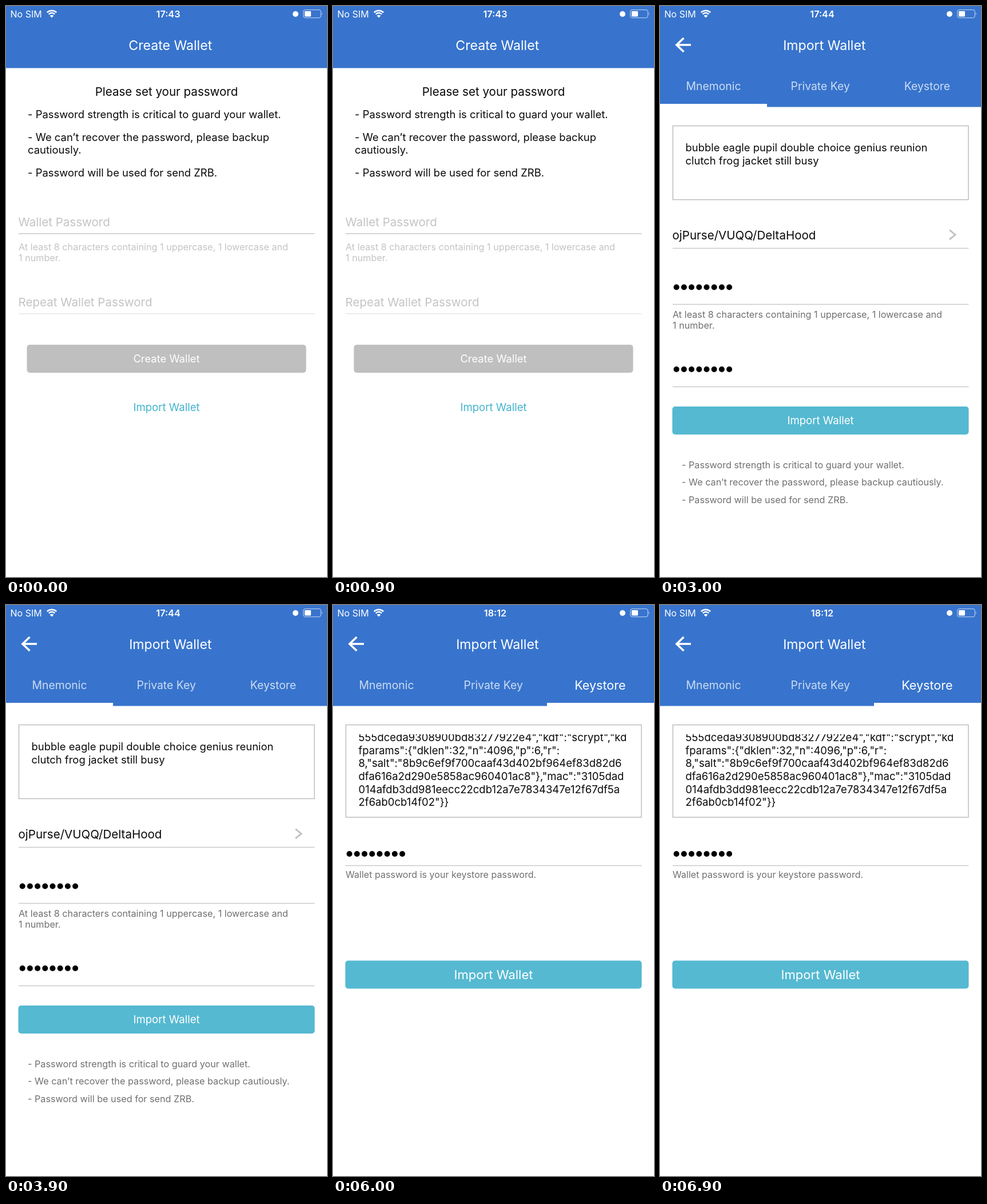
These frames come from a looping animation (561x998 px, 7.5 s). An HTML page:

```html
<!DOCTYPE html>
<html lang="en">
<head>
<meta charset="utf-8">
<title>Import wallet</title>
<style>
html, body { margin: 0; height: 100%; overflow: hidden; background: #fff; }
svg { display: block; width: 100%; height: 100%; }
text { font-family: Inter, Roboto, sans-serif; white-space: pre; }
</style>
</head>
<body>
<svg id="stage" viewBox="0 0 561 998"></svg>
<script>
const STEP = 1500;
const BLUE = '#3874cd', TEAL = '#55b9d1', GREY = '#bfbfbf';
const BLACK = '#0a0a0a', NOTE = '#707070', FAINT = '#c4c4c6';
const MID = 280.5;
const SMALL = 16.22, BODY = 18.45, LARGE = 20.55;

// y is the baseline
const text = (x, y, size, fill, str, extra = '') =>
  `<text x="${x}" y="${y}" font-size="${size}" fill="${fill}" ${extra}>${str}</text>`;
const centred = (x, y, size, fill, str, weight = 400) =>
  text(x, y, size, fill, str, `text-anchor="middle" font-weight="${weight}"`);
const rect = (x, y, w, h, fill, extra = '') =>
  `<rect x="${x}" y="${y}" width="${w}" height="${h}" fill="${fill}" ${extra}/>`;
const path = (d, stroke, width, extra = '') =>
  `<path d="${d}" fill="none" stroke="${stroke}" stroke-width="${width}" ${extra}/>`;
const rule = (y, colour = '#cbcbcb') => path(`M22 ${y}H539.5`, colour, 1.3);
const lines = (x, y, pitch, size, fill, list) =>
  list.map((str, i) => text(x, y + i * pitch, size, fill, str)).join('');
const dots = y => Array.from({ length: 8 }, (_, i) =>
  `<circle cx="${28.7 + i * 13.2}" cy="${y}" r="5"/>`).join('');
const button = (x, y, w, fill, label, size) =>
  rect(x, y, w, 49, fill, 'rx="5"') +
  centred(MID, y + 24.5 + size * 0.364, size, '#fff', label);
const box = h => rect(22.5, 209.5, 516.5, h, '#fff', 'stroke="#b9b9b9" stroke-width="1.4"');

const NOTES = [
  '- Password strength is critical to guard your wallet.',
  '- We can’t recover the password, please backup cautiously.',
  '- Password will be used for send ZRB.'
];
const HINT = ['At least 8 characters containing 1 uppercase, 1 lowercase and', '1 number.'];
const TABS = ['Mnemonic', 'Private Key', 'Keystore'];
const SOURCES = ['ZRB Cone/ZRB Wallet', 'ojPurse/VUQQ/DeltaHood', 'Bindle'];
const KEYSTORE = [
  '555dceda9308900bd83277922e4","kdf":"scrypt","kd',
  'fparams":{"dklen":32,"n":4096,"p":6,"r":',
  '8,"salt":"8b9c6ef9f700caaf43d402bf964ef83d82d6',
  'dfa616a2d290e5858ac960401ac8"},"mac":"3105dad',
  '014afdb3dd981eecc22cdb12a7e7834347e12f67df5a',
  '2f6ab0cb14f02"}}'
];

const hint = (y, fill = NOTE) => lines(22, y, 19, SMALL, fill, HINT);

const wifi = () => {
  const arc = (r, w) => {
    const d = r * Math.SQRT1_2;
    return path(`M${80 - d} ${19.5 - d}A${r} ${r} 0 0 1 ${80 + d} ${19.5 - d}`, '#fff', w);
  };
  return arc(11.6, 2.5) + arc(7.4, 2.5) +
    '<path d="M80 20.5l-3.3-3.5a4.7 4.7 0 0 1 6.6 0z" fill="#fff"/>';
};

const header = (height, clock, title) =>
  rect(0, 0, 561, height, BLUE) +
  text(7.5, 20.3, 16, '#fff', 'No SIM') + wifi() +
  centred(283.5, 20.2, 16.2, '#fff', clock, 600) +
  '<circle cx="506" cy="14" r="5" fill="#fff"/>' +
  rect(519.7, 6.7, 30.6, 14, 'none', 'rx="3.6" stroke="#a9c3ea" stroke-width="1.3"') +
  rect(522, 9, 11, 9.4, '#fff', 'rx="1.3"') +
  '<path d="M551.8 11.3q2.4 2.4 0 4.8z" fill="#a9c3ea"/>' +
  centred(287.3, 76.6, 23.1, '#fff', title);

// The mnemonic tab keeps its plain label style while underlined.
const importHeader = (clock, active) =>
  header(176.5, clock, 'Import Wallet') +
  path('M54 68H30M41.5 56L29 68L41.5 80', '#fff', 3.6) +
  TABS.map((name, i) => {
    const bright = i && i === active, size = bright ? 21.6 : 19.4;
    return centred(93.5 + i * 186.7, 140.2 + size * 0.364, size, bright ? '#fff' : '#cddcf3', name);
  }).join('') +
  rect(active * 187, 171, 187, 6, '#fff');

const mnemonic = clock =>
  importHeader(clock, 0) + box(129) +
  path('M506 391.5L516 399.7L506 408', '#c3c3c3', 3) +
  rule(423.5) + rule(521.5) + rule(665.5) +
  lines(38, 808, 30.3, SMALL, NOTE, NOTES);

const createScene = () =>
  header(108.5, '17:43', 'Create Wallet') +
  centred(MID, 156.5, LARGE, BLACK, 'Please set your password') +
  text(38, 196.3, BODY, BLACK, NOTES[0]) +
  lines(38, 235.7, 22.6, BODY, BLACK, ['- We can’t recover the password, please backup', 'cautiously.']) +
  text(38, 297.6, BODY, BLACK, NOTES[2]) +
  text(21.5, 384.5, LARGE, FAINT, 'Wallet Password') + rule(397.8, '#bdbdbd') +
  hint(426.7, FAINT) +
  text(21.5, 524.5, LARGE, FAINT, 'Repeat Wallet Password') + rule(537.8, '#e2e2e4') +
  button(36.5, 592, 488, GREY, 'Create Wallet', 18.4) +
  centred(MID, 708.2, 18.6, '#43b3cd', 'Import Wallet');

const sourceScene = () =>
  mnemonic('17:43') +
  lines(44.5, 255.2, 22.6, BODY, '#a9a9a9', ['Enter your mnemonic words, use space to separate', 'the mnemonic words']) +
  text(21.5, 407.5, LARGE, '#a3a3a3', 'Select the source of mnemonic') +
  '<filter id="shade"><feDropShadow dx="7" dy="6" stdDeviation="6" flood-opacity=".6"/></filter>' +
  rect(22, 432, 471.5, 217.5, '#fff', 'filter="url(#shade)"') +
  lines(41.5, 487.5, 67.8, LARGE, BLACK, SOURCES) +
  button(21.5, 700, 518, GREY, 'Import Wallet', 18.6);

const mnemonicScene = () =>
  mnemonic('17:44') +
  lines(44.5, 254.3, 22.7, BODY, BLACK, ['bubble eagle pupil double choice genius reunion', 'clutch frog jacket still busy']) +
  text(21.5, 407.5, LARGE, BLACK, SOURCES[1]) +
  dots(491.5) + hint(545) + dots(635) +
  button(21.5, 700, 518, TEAL, 'Import Wallet', 18.6);

const keyScene = () =>
  importHeader('18:12', 1) + box(161.5) +
  lines(44.5, 254.3, 22.7, 18.73, BLACK, ['9c32cff4b32b06f4d3b1c8646959a3e20eb604957d', 'c9f75e364c4907f424b262']) +
  dots(435) + rule(455.5) + hint(477.2) + dots(563.2) + rule(583.3) +
  button(21.5, 616, 518, TEAL, 'Import Wallet', 22.1) +
  lines(36.5, 717.3, 37.1, SMALL, NOTE, NOTES);

const keystoreScene = () =>
  importHeader('18:12', 2) + box(161.5) +
  lines(44.5, 238.2, 22.6, 18.5, BLACK, KEYSTORE) +
  rect(24, 211, 512, 15, '#fff') +
  dots(435) + rule(455.5) +
  text(22, 476.8, 16.08, NOTE, 'Wallet password is your keystore password.') +
  button(21.5, 621.5, 518, TEAL, 'Import Wallet', 22.1);

const scenes = [createScene, sourceScene, mnemonicScene, keyScene, keystoreScene];
const stage = document.getElementById('stage');
let shown = -1;

function draw() {
  const index = Math.floor(performance.now() / STEP) % scenes.length;
  if (index !== shown) stage.innerHTML = scenes[shown = index]();
  requestAnimationFrame(draw);
}
draw();
</script>
</body>
</html>
```
